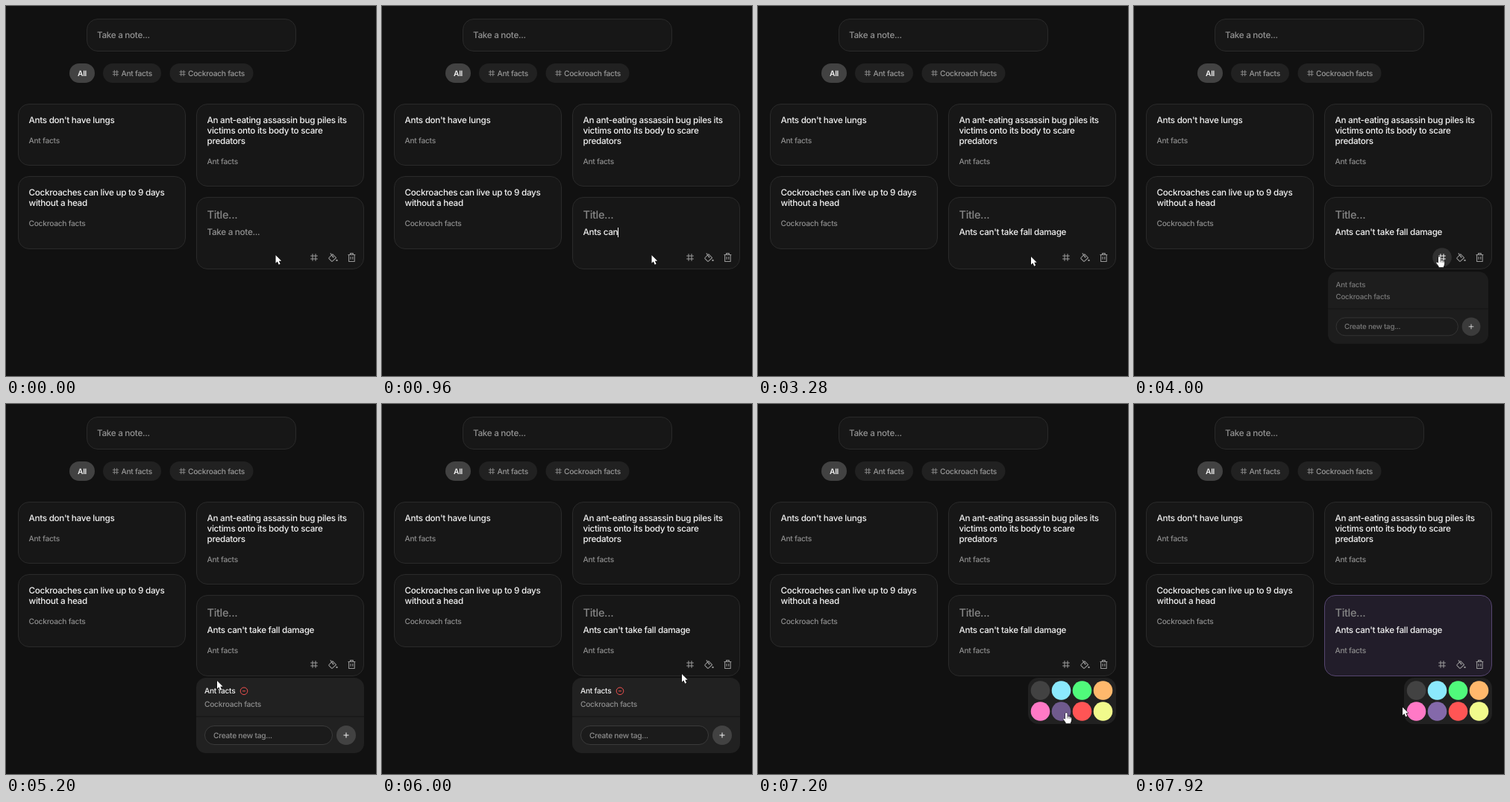
These frames come from a looping animation (496x496 px, 8 s). An HTML page with a canvas:

```html
<!DOCTYPE html>
<html lang="en">
<head>
<meta charset="utf-8">
<title>Notes</title>
<style>
  html, body { margin: 0; width: 100%; height: 100%; overflow: hidden; background: #111; }
  canvas { display: block; width: 496px; height: 496px; }
</style>
</head>
<body>
<canvas id="stage" width="496" height="496"></canvas>
<script>
const ctx = document.getElementById('stage').getContext('2d');
const LOOP = 8000, STEP = 80;
const NOTE = "Ants can't take fall damage";
const BODY = 11.7, SMALL = 10.2, TITLE = 14.6, TRACKING = -0.025;
const WHITE = '#f2f2f2', MUTED = '#8e8e8e', RED = '#f0504e';
const SWATCHES = ['#424242', '#8be9fd', '#50fa7b', '#ffb86c', '#ff79c6', '#bd93f9', '#ff5555', '#f1fa8c'];
const PURPLE = 5;

// Typing bursts: start time, then the length of the note after each step
const BURSTS = [
  [400, 1], [560, 2, 3, 4, 6, 7, 8], [1200, 9, 10, 12],
  [1520, 13, 14, 16, 18], [1920, 19, 21], [2160, 22, 23, 24, 25, 27]
];

// Pointer path: time, x, y
const PATH = [
  [3200, 361.5, 334], [3280, 366, 336], [3440, 394, 340], [3600, 409.5, 336],
  [4080, 409.5, 336], [4320, 372, 352], [4640, 283, 371],
  [5360, 283, 371], [5680, 330, 374], [6000, 402, 362], [6240, 437, 348],
  [6480, 437, 348], [6800, 420, 370], [7120, 392, 396], [7200, 413.5, 414],
  [7360, 420, 415], [7440, 420, 415], [7600, 413, 414],
  [7680, 413, 414], [7840, 396, 409], [7920, 360, 406.5]
];

const ARROW = new Path2D('M0 0V11.6L2.6 9.2L4.5 13.6L6.6 12.7L4.7 8.4H8.3Z');
const HAND = new Path2D('M-1.6 1.4Q-1.6 0-.2 0Q1.2 0 1.2 1.4V5.2Q2.6 4.6 3.5 5.7' +
  'Q4.9 5.1 5.6 6.4Q7.2 6.1 7.2 8V10.5Q7.2 12.4 6 13.8V15.4H-1V14L-4.3 9.8Q-5 8.4-3.9 8Q-2.9 7.7-1.6 9.3Z');
const KNUCKLES = new Path2D('M1.2 5.2V8M3.5 5.8V8.2M5.6 6.5V8.6');
const HASH = new Path2D('M-4.8-2H4.8M-4.8 2H4.8M-2-4.8V4.8M2-4.8V4.8');
const BUCKET = new Path2D('M-.4-4.3L4.4.5L-.6 5.1Q-1.2 5.6-1.8 5.1L-5.2 1.7Q-5.7 1.1-5.2.5ZM-3.4-5.6L.2-.6');
const BIN = new Path2D('M-4.9-3.6H4.9M-3.8-3.6V5.4H3.8V-3.6M-1.9-3.6V-5.4H1.9V-3.6M-1.4-1V2.8M1.4-1V2.8');

const clamp = v => Math.max(0, Math.min(1, v));
const ramp = (t, start, span) => clamp((t - start) / span);
const mix = (a, b, p) => `rgb(${a.map((v, i) => Math.round(v + (b[i] - v) * p))})`;

function text(str, x, y, size, color, weight = 450) {
  ctx.font = `${weight} ${size}px Inter, sans-serif`;
  ctx.letterSpacing = `${size * TRACKING}px`;
  ctx.fillStyle = color;
  ctx.fillText(str, x, y + size * 0.364);
}

function box(x, y, w, h, r, fill, stroke) {
  ctx.beginPath();
  ctx.roundRect(x, y, w, h, r);
  if (fill) { ctx.fillStyle = fill; ctx.fill(); }
  if (stroke) { ctx.strokeStyle = stroke; ctx.lineWidth = 1; ctx.stroke(); }
}

function disc(x, y, r, fill) {
  ctx.beginPath();
  ctx.arc(x, y, r, 0, 7);
  ctx.fillStyle = fill;
  ctx.fill();
}

function icon(path, x, y, color, scale = 1) {
  ctx.save();
  ctx.translate(x, y);
  ctx.scale(scale, scale);
  ctx.strokeStyle = color;
  ctx.lineWidth = 1.05;
  ctx.lineJoin = 'round';
  ctx.stroke(path);
  if (path === BUCKET) {
    disc(0.4, -0.4, 1, color);
    disc(5.3, 3.9, 1.2, color);
  }
  ctx.restore();
}

// Popups fade and grow around their centre
function popup(cx, cy, p, draw) {
  if (p <= 0) return;
  const s = 0.82 + 0.18 * p;
  ctx.save();
  ctx.translate(cx, cy - (1 - s) * 22);
  ctx.scale(s, s);
  ctx.translate(-cx, -cy);
  draw(ctx.globalAlpha = p ** 0.7);
  ctx.restore();
}

function card(x, y, w, h, fill = '#171717', stroke = '#2a2a2a') {
  box(x + 0.5, y + 0.5, w - 1, h - 1, 14.5, fill, stroke);
}

function note(x, y, h, lines, tag) {
  card(x, y, 225, h);
  lines.forEach((line, i) => text(line, x + 14.5, y + 21.8 + 14 * i, BODY, WHITE, 500));
  text(tag, x + 14.5, y + 35 + 14 * lines.length, SMALL, MUTED);
}

function chip(x, w, label) {
  box(x, 77, w, 26, 13, '#212121');
  icon(HASH, x + 17, 90, MUTED, 0.85);
  text(label, x + 24.5, 90, SMALL, '#999', 500);
}

function board() {
  ctx.fillStyle = '#111';
  ctx.fillRect(0, 0, 496, 496);
  card(108, 17, 281, 44);
  text('Take a note...', 122, 39, BODY, '#929292');
  box(85, 77, 34, 26, 13, '#424242');
  text('All', 96, 90, SMALL, WHITE, 600);
  chip(130, 78, 'Ant facts');
  chip(219.5, 112, 'Cockroach facts');
  note(16, 131, 83, ["Ants don't have lungs"], 'Ant facts');
  note(16, 228, 98, ['Cockroaches can live up to 9 days', 'without a head'], 'Cockroach facts');
  note(255, 131, 111, ['An ant-eating assassin bug piles its', 'victims onto its body to scare', 'predators'], 'Ant facts');
}

function typed(t) {
  let n = 0;
  for (const [start, ...counts] of BURSTS) {
    if (t >= start) n = counts[Math.min(counts.length - 1, Math.floor((t - start) / STEP))];
  }
  return NOTE.slice(0, n);
}

function editor(t, bottom, hover) {
  const p = ramp(t, 7700, 200);
  card(255, 256, 225, bottom - 256, mix([23, 23, 23], [34, 29, 42], p), mix([42, 42, 42], [86, 70, 112], p));
  text('Title...', 269.5, 279.5, TITLE, '#858585');

  const str = typed(t);
  if (str) text(str, 269.5, 303, BODY, WHITE, 500);
  else text('Take a note...', 269.5, 303, BODY, '#929292');
  if ((t >= 400 && t < 3040) || (t >= 3440 && t < 3760)) {
    ctx.fillStyle = WHITE;
    ctx.fillRect(Math.round(269.5 + ctx.measureText(str).width), 297, 1, 13);
  }
  if (t >= 5200) text('Ant facts', 269.5, 330.5, SMALL, MUTED);

  [HASH, BUCKET, BIN].forEach((path, i) => {
    const x = 413 + 25.2 * i, on = hover === i;
    if (on) disc(x, bottom - 16, 12.8, '#303030');
    icon(path, x, bottom - 16, on ? WHITE : '#999');
  });
}

function tagMenu(t, top) {
  const p = ramp(t, 3880, 160) - ramp(t, 6285, 160);
  const chosen = t >= 5200;
  popup(367.5, top + 50.5, p, () => {
    box(255, top, 225, 101, 13, '#212121');
    ctx.fillStyle = '#141414';
    ctx.fillRect(255, top + 51.5, 225, 1);
    text('Ant facts', 266, top + 17.5, SMALL, chosen ? WHITE : MUTED, chosen ? 500 : 450);
    text('Cockroach facts', 266, top + 35, SMALL, MUTED);
    if (chosen) {
      ctx.beginPath();
      ctx.arc(319, top + 17.8, 4.8, 0, 7);
      ctx.moveTo(317, top + 17.8);
      ctx.lineTo(321, top + 17.8);
      ctx.strokeStyle = RED;
      ctx.lineWidth = 1;
      ctx.stroke();
    }
    box(266.5, top + 64.5, 171, 25, 12.5, '#1b1b1b', '#3a3a3a');
    text('Create new tag...', 278, top + 76.8, SMALL, MUTED);
    disc(456, top + 77, 13, '#424242');
    ctx.fillStyle = WHITE;
    ctx.fillRect(452.5, top + 76.5, 7, 1);
    ctx.fillRect(455.5, top + 73.5, 1, 7);
  });
}

function palette(t, top) {
  const p = ramp(t, 6295, 160);
  const dim = ramp(t, 7120, 80) - ramp(t, 7880, 150);
  popup(421, top + 31, p, alpha => {
    box(362, top, 118, 62, 14, '#212121');
    SWATCHES.forEach((color, i) => {
      ctx.globalAlpha = alpha * (i === PURPLE ? 1 - dim / 2 : 1);
      disc(378.5 + 28 * (i % 4), top + 17 + 28 * (i >> 2), 12.8, color);
    });
  });
}

function pointerAt(t) {
  const i = PATH.findIndex(k => k[0] > t);
  if (i < 0) return PATH[PATH.length - 1].slice(1);
  if (i === 0) return PATH[0].slice(1);
  const [t0, x0, y0] = PATH[i - 1], [t1, x1, y1] = PATH[i];
  const p = (t - t0) / (t1 - t0);
  return [x0 + (x1 - x0) * p, y0 + (y1 - y0) * p];
}

function pointer(x, y, hand) {
  const path = hand ? HAND : ARROW;
  ctx.save();
  ctx.translate(x, y);
  ctx.scale(0.93, 0.93);
  ctx.lineJoin = 'round';
  ctx.lineWidth = 1;
  ctx.strokeStyle = '#000';
  ctx.stroke(path);
  ctx.fillStyle = '#fff';
  ctx.fill(path);
  if (hand) {
    ctx.lineWidth = 0.6;
    ctx.stroke(KNUCKLES);
  }
  ctx.restore();
}

function draw(t) {
  const bottom = t >= 5200 ? 365 : 353, top = bottom + 2;
  const [x, y] = pointerAt(t);
  const near = (cx, cy, r) => Math.hypot(x - cx, y - cy) < r;
  const hover = [0, 1, 2].findIndex(i => near(413 + 25.2 * i, bottom - 16, 12.8));
  const onTag = t >= 4160 && t < 5200 && x < 309 && Math.abs(y - top - 18) < 7;
  const onSwatch = t >= 6400 && SWATCHES.some((c, i) => near(378.5 + 28 * (i % 4), top + 17 + 28 * (i >> 2), 12.8));

  board();
  editor(t, bottom, hover);
  tagMenu(t, top);
  palette(t, top);
  pointer(x, y, hover >= 0 || onTag || onSwatch);
}

ctx.textRendering = 'geometricPrecision';
const begin = performance.now();
function tick() {
  const t = (performance.now() - begin) % LOOP;
  draw(Math.floor(t / STEP) * STEP);
  requestAnimationFrame(tick);
}
tick();
</script>
</body>
</html>
```
